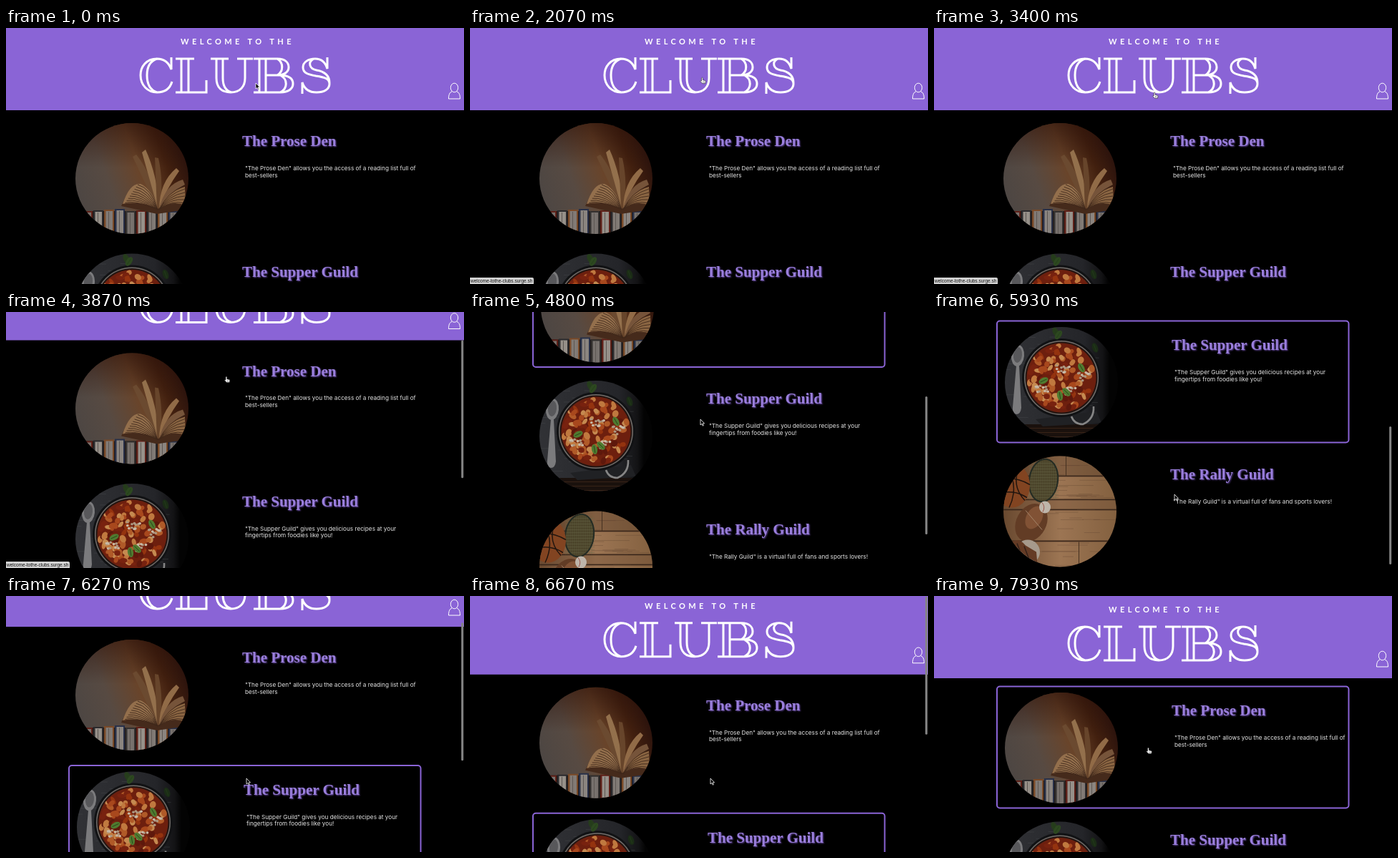
An HTML page that plays this animation: 640 px wide and 358 px high, repeating every 8000 ms.

```html
<!DOCTYPE html>
<html lang="en">
<head>
<meta charset="utf-8">
<title>Clubs</title>
<style>
  html, body { margin: 0; width: 100%; height: 100%; overflow: hidden; background: #000; }
  svg { display: block; width: 100%; height: 100%; }
  .welcome { font: 700 11px Lato, sans-serif; letter-spacing: 4.4px; fill: #fff; }
  .title { font: 700 21px "Liberation Serif", serif; fill: #9a7fdc; text-shadow: 1px 1px 2px #65499f; }
  .copy { font: 400 8.2px Inter, sans-serif; fill: #e6e6e6; }
  .status { font: 6.5px "Liberation Sans", sans-serif; fill: #111; }
  .line { fill: none; stroke: #fff; }
</style>
</head>
<body>
<svg viewBox="0 0 640 358">
  <defs>
    <clipPath id="round"><ellipse cx="176" cy="210.5" rx="79" ry="77.5"/></clipPath>
    <linearGradient id="wall" x1="0" y1=".65" x2="1" y2=".3">
      <stop offset="0" stop-color="#4c4643"/><stop offset=".3" stop-color="#574a42"/>
      <stop offset=".58" stop-color="#6a4429"/><stop offset=".8" stop-color="#42200f"/><stop offset="1" stop-color="#27100c"/>
    </linearGradient>
    <linearGradient id="dusk" x1="0" y1="0" x2="0" y2="1">
      <stop offset="0" stop-color="#2a1009" stop-opacity=".6"/><stop offset=".4" stop-color="#2a1009" stop-opacity="0"/>
    </linearGradient>
    <linearGradient id="slate">
      <stop offset="0" stop-color="#313236"/><stop offset=".7" stop-color="#242529"/>
      <stop offset=".86" stop-color="#131315"/><stop offset=".92" stop-color="#030303"/>
    </linearGradient>
    <linearGradient id="wood">
      <stop offset="0" stop-color="#68482f"/><stop offset=".5" stop-color="#9c7553"/><stop offset="1" stop-color="#83603f"/>
    </linearGradient>
  </defs>
  <g id="page">
    <rect width="640" height="115" fill="#8a64d6"/>
    <text class="welcome" x="244" y="23">WELCOME TO THE</text>
    <g class="line" stroke-width="3">
      <path d="M231 41V58C227 47 219 43 211 43C196 43 188 54 188 66C188 80 198 90 211 90C222 90 229 85 232 75M211 43C202 46 197 54 197 66C197 79 202 87 211 90"/>
      <path d="M237 43H263M245 43V90M255 43V90M237 90H280V73"/>
      <path d="M286 43H311M323 43H345M294 43V70C294 84 302 90 314 90C327 90 334 82 334 70V43M303 43V70C303 82 308 88 315 90"/>
      <path d="M346 43H379C391 43 395 49 395 55C395 62 388 66 379 66H363M354 43V90M363 43V90M346 90H383C396 90 401 84 401 78C401 70 394 66 382 66M379 43C388 48 388 61 379 66M383 66C394 71 394 85 383 90"/>
      <path d="M449 41V57C446 47 440 43 432 43C422 43 415 48 415 55C415 63 422 65 433 67C446 69 452 71 452 78C452 86 444 90 434 90C424 90 417 86 414 76V92M430 43C421 48 424 57 434 59C446 61 452 67 452 77"/>
    </g>
    <g class="line" stroke-width="1">
      <ellipse cx="626.5" cy="83.5" rx="5.2" ry="6.3"/>
      <path d="M623 89C620 90 618.5 93 618.5 99H634.5C634.5 93 633 90 630 89"/>
    </g>
    <g id="cards"></g>
  </g>
  <rect id="thumb" x="636.2" width="3" height="193" rx="1.5" fill="#858585"/>
  <g id="status">
    <path d="M0 349H87Q89 349 89 351V358H0Z" fill="#d2d2d2"/>
    <text class="status" x="1" y="355.7">welcome-tothe-clubs.surge.sh</text>
  </g>
  <g id="cursor" stroke="#fff" stroke-width=".8" fill="#000">
    <path id="arrow" d="M0 0V8L1.8 6.4L3.2 9.2L4.4 8.7L3.1 5.9H5.6Z"/>
    <path id="hand" fill="#fff" stroke="#222" stroke-width=".6" d="M0 .8Q1 -.4 1.8 .8V3.8L5 4.5Q6 4.8 5.8 6L5.2 8.6H1.3L-1.6 5.4Q-1.2 4.2 0 5.2ZM2.3 5.6V7.4M3.8 5.8V7.4"/>
  </g>
</svg>
<script>
const $ = id => document.getElementById(id);
const times = (n, make) => Array.from({ length: n }, (_, i) => make(i)).join('');
const ellipse = (x, y, rx, ry, fill, turn = 0) =>
  `<ellipse cx="${x}" cy="${y}" rx="${rx}" ry="${ry}" fill="${fill}" transform="rotate(${turn} ${x} ${y})"/>`;
const rect = (x, y, w, h, fill) => `<rect x="${x}" y="${y}" width="${w}" height="${h}" fill="${fill}"/>`;
const path = (d, fill, stroke = 'none', width = 1) =>
  `<path d="${d}" fill="${fill}" stroke="${stroke}" stroke-width="${width}"/>`;

let seed = 11;
const random = () => (seed = seed * 16807 % 2147483647) / 2147483647;
const pick = list => list[Math.floor(random() * list.length)];

function books() {
  const covers = ['#33302f', '#5e2018', '#2b2a2d', '#7a4a28', '#283048'];
  const pages = ['#8b8580', '#77716d', '#969089', '#817a75'];
  return rect(96, 132, 160, 158, 'url(#wall)') + rect(96, 132, 160, 158, 'url(#dusk)') +
    rect(96, 256, 160, 34, '#1c1412') +
    times(11, i => {
      const x = 92 + i * 15, y = 253 + i * 7 % 4;
      return rect(x, y, 14, 38, covers[i % 5]) + rect(x + 2.5, y + 2, 9.5, 36, pages[i % 4]) +
        rect(x + 6, y + 3, 1, 35, '#5d5753');
    }) +
    path('M161 249L169 232Q191 226 212 251Q228 228 248 235L252 254L211 260Z', '#452a1b') +
    path('M211 253L177 180L182 177Q206 207 213 252Z', '#6b4a30') +
    path('M212 252L190 174L195 170Q211 205 214 250Z', '#93704c') +
    path('M211 253L208 181L213 182Q221 218 214 252Z', '#67452b') +
    path('M214 252Q215 215 238 196L242 200Q224 225 214 252Z', '#916b47') +
    path('M214 253Q222 219 247 212L250 219Q225 232 214 253Z', '#76543a') +
    path('M163 246Q173 216 188 218Q204 225 212 254Q190 241 163 246Z', '#936f4c') +
    path('M214 254Q225 229 250 222L251 248Q230 240 214 254Z', '#8a6542') +
    times(9, i => path(`M212 254Q${203 - i * 3} ${224 + i * 2} ${184 - i * 2.2} ${219 + i * 3.2}`, 'none', '#3f281a', .9)) +
    times(6, i => path(`M214 254Q${225 + i} ${230 + i * 2} 250 ${220 + i * 5}`, 'none', '#3f281a', .9));
}

function stew() {
  const blob = () => {
    const angle = random() * 6.283, r = 45 * Math.sqrt(random());
    return ellipse(176 + r * Math.cos(angle), 204 + r * Math.sin(angle), 3 + random() * 3, 2.5 + random() * 2.2,
      pick(['#b05a28', '#c0793f', '#94330f', '#c58a50', '#5e180c', '#a8481d', '#78220f']), random() * 180);
  };
  const crumbs = ([x, y]) => times(12, () =>
    ellipse(x + random() * 18 - 9, y + random() * 12 - 6, 1.9, 1.7, pick(['#c8b9a6', '#ac9781'])));
  const leaf = (x, y, turn, fill = '#507b30') => ellipse(x, y, 7, 4, fill, turn) +
    `<path d="M${x - 5} ${y}h10" stroke="#233f19" stroke-width=".8" transform="rotate(${turn} ${x} ${y})"/>`;
  return rect(96, 132, 160, 158, 'url(#slate)') +
    times(40, () => rect(97 + random() * 120, 134 + random() * 130, 4 + random() * 14, 1, '#4a4b4f66')) +
    rect(96, 269, 160, 24, '#1a110d') +
    times(3, i => rect(96, 274 + i * 6, 140, 1, '#382317')) +
    path('M140 262L225 251L232 267L150 272Z', '#202124') +
    ellipse(115, 173, 9, 15, '#7b7b7d', 5) + ellipse(115, 172, 6, 11, '#58585b', 5) +
    path('M113 187L117 187L120 246Q119 255 113 255Q107 254 108 245Z', '#7b7b7d') +
    path('M190 258Q194 269 206 269Q222 262 221 244', 'none', '#858585', 2.6) +
    ellipse(176, 204, 55, 55, '#111214') + ellipse(176, 204, 52, 52, '#716e6b') +
    ellipse(176, 204, 50.5, 50.5, '#241511') + ellipse(176, 204, 48.5, 48.5, '#6d1f0e') +
    times(125, blob) + [[149, 221], [208, 202], [190, 222], [178, 192]].map(crumbs).join('') +
    leaf(204, 190, 60) + leaf(183, 224, 45) + leaf(151, 208, -25) + leaf(174, 229, 80) +
    leaf(168, 140, 65, '#263c1c') + leaf(172, 144, -55, '#2d4820') + leaf(223, 162, 70, '#1b2c16');
}

function sports() {
  return rect(96, 132, 160, 158, 'url(#wood)') + rect(96, 132, 160, 28, '#4a302055') +
    [160, 193, 207, 251].map(y => rect(96, y, 160, 1.8, '#3b271b')).join('') +
    rect(96, 195, 160, 12, '#70503755') +
    times(34, () => rect(145 + random() * 80, 134 + random() * 152, 15 + random() * 40, .6, '#5d402d88')) +
    rect(184, 133, 1, 28, '#453020') + rect(202, 253, 1, 38, '#453020') +
    ellipse(153, 167, 20, 30, '#4a4229', 8) +
    times(13, i => path(`M${134 + i * 3} 139V194M134 ${143 + i * 4}H174`, 'none', '#69694a', .4)) +
    `<ellipse cx="153" cy="167" rx="20" ry="30" fill="none" stroke="#242b23" stroke-width="2" transform="rotate(8 153 167)"/>` +
    ellipse(109, 174, 25, 31, '#824421') +
    path('M86 166Q112 160 134 173M100 145Q120 174 105 205M120 147Q107 174 127 195M86 187Q110 178 130 191', 'none', '#21150f', 1.5) +
    ellipse(136, 226, 21, 28, '#623c25', 28) + ellipse(140, 219, 11, 17, '#815235', 28) +
    path('M128 209L151 236', 'none', '#a38469', 1) +
    ellipse(155, 204.5, 8, 8.5, '#beb5aa') + path('M151 198Q156 204 152 211', 'none', '#8e3d32', .8) +
    ellipse(131, 267, 17, 17, '#a69a8c') +
    path('M108 253Q119 246 128 258L143 267L145 290H105Z', '#643b25') +
    path('M116 255L126 281M126 259L135 283', 'none', '#332019', 1.5);
}

const cards = [
  ['The Prose Den', ['allows you the access of a reading list full of', 'best-sellers'], books],
  ['The Supper Guild', ['gives you delicious recipes at your', 'fingertips from foodies like you!'], stew],
  ['The Rally Guild', ['is a virtual full of fans and sports lovers!'], sports],
];
$('cards').innerHTML = cards.map(([name, copy, picture], i) => `
  <g transform="translate(0 ${i * 182.5})">
    <rect class="frame" x="88" y="126.5" width="491.5" height="170" rx="4" fill="none" stroke="#8a64d6" stroke-width="2"/>
    <g class="content">
      <g clip-path="url(#round)">${picture()}</g>
      <text class="title" x="330" y="165.3">${name}</text>
      ${copy.map((line, n) => `<text class="copy" x="334" y="${199 + n * 9.5}">${n ? '' : `"${name}" `}${line}</text>`).join('')}
    </g>
  </g>`).join('');
const frames = [...document.querySelectorAll('.frame')];
const contents = [...document.querySelectorAll('.content')];

// Each key is [time, value, ...]; motion between keys is eased.
function tween(keys, t, column = 1) {
  const next = keys.findIndex(key => key[0] > t);
  if (next < 0) return keys[keys.length - 1][column];
  if (!next) return keys[0][column];
  const a = keys[next - 1], b = keys[next];
  const p = (t - a[0]) / (b[0] - a[0]);
  return a[column] + (b[column] - a[column]) * p * p * (3 - 2 * p);
}
const step = (keys, t) => keys.filter(key => key[0] <= t).pop()[1];

const scrollKeys = [[3650, 0], [3870, 75.5], [4200, 105], [4480, 105], [4800, 219.5], [5270, 219.5],
  [5700, 296.5], [5935, 296.5], [6270, 72], [6750, 0]];
const cursorKeys = [[900, 349, 77], [1500, 323.5, 69], [2700, 323.5, 69], [3450, 307, 90], [4200, 307, 90],
  [4450, 322, 150], [4950, 322, 150], [5280, 336, 255], [6900, 336, 255], [7500, 298.5, 212]];
const hoverKeys = [[0, -1], [4330, 0], [5270, 1], [6930, 0]];
const handKeys = [[0, false], [1270, true], [4400, false], [6930, true]];
const thumbKeys = [[3600, 0], [3700, 1], [7200, 1], [7450, 0]];

function draw(now) {
  const t = now % 8000;
  const scroll = tween(scrollKeys, t);
  const hover = step(hoverKeys, t);
  const hand = step(handKeys, t);
  $('page').setAttribute('transform', `translate(0 ${-scroll})`);
  frames.forEach((frame, i) => frame.setAttribute('visibility', i === hover ? 'visible' : 'hidden'));
  contents.forEach((content, i) => content.setAttribute('transform', i === hover ? 'translate(2 2)' : ''));
  $('thumb').setAttribute('y', scroll * 358 / 655 - 2);
  $('thumb').setAttribute('opacity', tween(thumbKeys, t));
  $('status').setAttribute('visibility', t > 1270 && t < 4400 ? 'visible' : 'hidden');
  $('cursor').setAttribute('transform', `translate(${tween(cursorKeys, t)} ${tween(cursorKeys, t, 2)})`);
  $('hand').setAttribute('visibility', hand ? 'visible' : 'hidden');
  $('arrow').setAttribute('visibility', hand ? 'hidden' : 'visible');
  requestAnimationFrame(draw);
}
requestAnimationFrame(draw);
</script>
</body>
</html>
```
